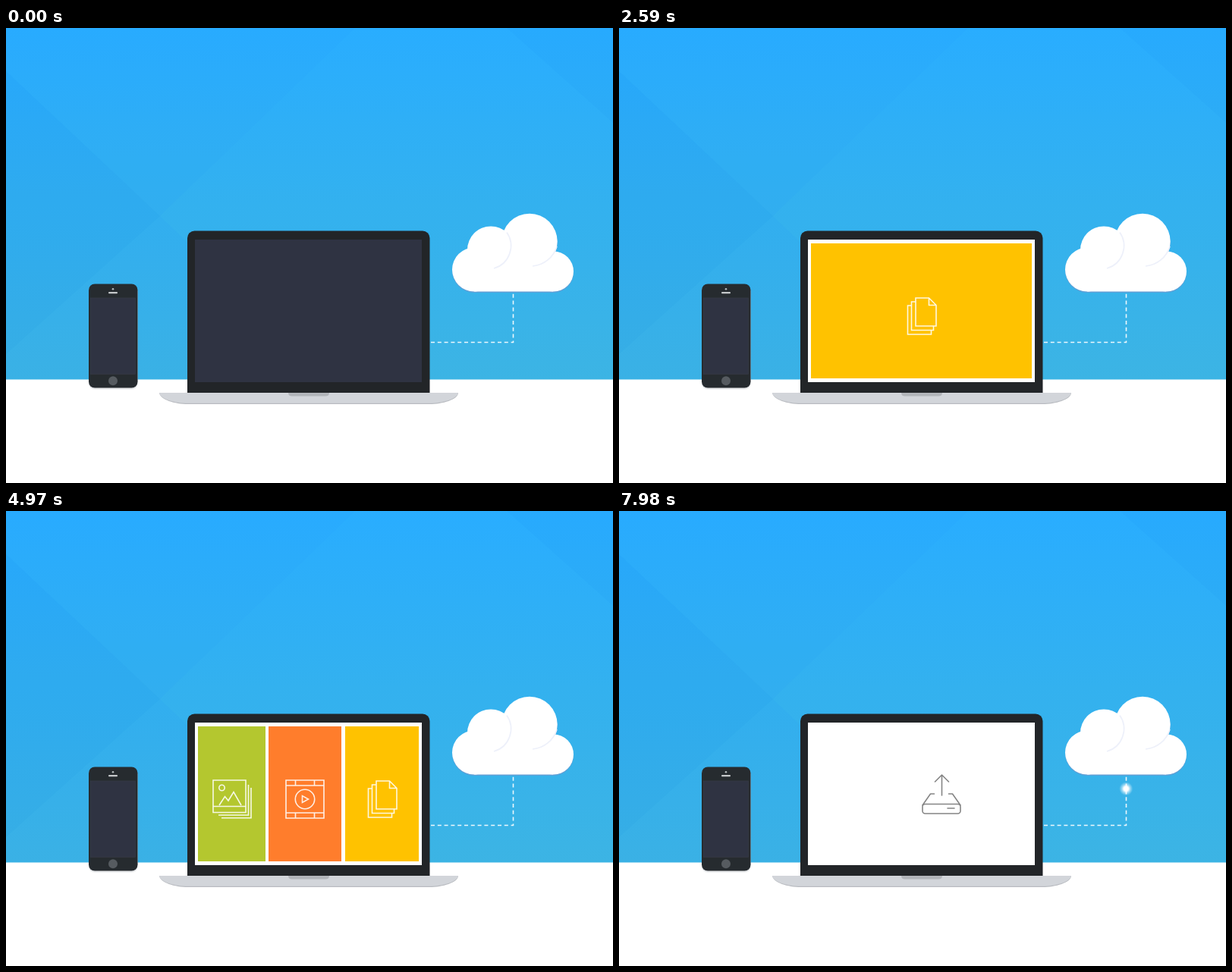
Write an HTML page that moves like this. It is 800 px wide and 600 px high and loops after 8 s.

```html
<!DOCTYPE html>
<html lang="en">
<head>
<meta charset="utf-8">
<title>Files to the cloud</title>
<style>
  html, body { margin: 0; width: 100%; height: 100%; overflow: hidden; background: #fff; }
  .stage { position: relative; width: 800px; height: 600px; overflow: hidden; }
  .scene { position: absolute; inset: 0; display: block; }

  .screen { position: absolute; left: 249px; top: 279px; width: 299px; height: 188px; overflow: hidden; background: #2f3342; }
  .page { position: absolute; inset: 0; background: #fff; }
  .row { position: absolute; inset: 0; }
  .panel { position: absolute; top: 5px; left: 4px; width: 0; height: 178px; overflow: hidden; }
  .icon { position: absolute; left: 50%; top: 70px; width: 52px; height: 52px; margin-left: -26px;
          fill: none; stroke: #fff; stroke-opacity: .88; stroke-width: 1.6; }
  .drive { left: 150px; top: 68px; stroke: #858585; stroke-opacity: 1; stroke-linecap: round; stroke-linejoin: round; }
  .green { background: #b4c72f; }
  .orange { background: #ff7d2c; }
  .yellow { background: #ffc200; }

  .page, .row, .panel, .icon, .pulse { animation: 8s linear infinite; }
  .page { animation-name: wake; }
  .row { animation-name: leave; }
  .yellow { animation-name: yellow; }
  .orange { animation-name: orange; }
  .green { animation-name: green; }
  .yellow .icon { animation-name: settle; }
  .drive { animation-name: drive; }
  .pulse { animation-name: pulse; }

  @keyframes wake {
    0%, 6.125% { opacity: 0; }
    8.75%, 100% { opacity: 1; }
  }
  @keyframes yellow {
    0%, 6.125% { left: 4px; width: 291px; transform: translateY(-187px); animation-timing-function: cubic-bezier(.65, 0, .35, 1); }
    18.125% { transform: none; }
    32.1% { left: 4px; width: 291px; animation-timing-function: cubic-bezier(.6, 0, .1, 1); }
    42.5% { left: 152px; width: 143px; }
    54.75% { left: 152px; width: 143px; animation-timing-function: cubic-bezier(.6, 0, .1, 1); }
    64.75%, 100% { left: 200px; width: 95px; transform: none; }
  }
  @keyframes settle {
    0%, 6.125% { transform: translateY(104px); animation-timing-function: cubic-bezier(.65, 0, .35, 1); }
    18.125%, 100% { transform: none; }
  }
  @keyframes orange {
    0%, 32.1% { left: 4px; width: 0; animation-timing-function: cubic-bezier(.6, 0, .1, 1); }
    42.5% { left: 4px; width: 143px; }
    54.75% { left: 4px; width: 143px; animation-timing-function: cubic-bezier(.6, 0, .1, 1); }
    64.75%, 100% { left: 101px; width: 94px; }
  }
  @keyframes green {
    0%, 54.75% { width: 0; animation-timing-function: cubic-bezier(.6, 0, .1, 1); }
    64.75%, 100% { width: 92.5px; }
  }
  @keyframes leave {
    0%, 75.625% { transform: none; animation-timing-function: cubic-bezier(.7, 0, .84, 0); }
    87.875%, 100% { transform: translateX(300px); }
  }
  @keyframes drive {
    0%, 86.6% { opacity: 0; }
    91.2%, 100% { opacity: 1; }
  }
  @keyframes pulse {
    0%, 84.87% { opacity: 0; transform: translate(558px, 414.5px); }
    84.875% { opacity: 1; transform: translate(558px, 414.5px); animation-timing-function: cubic-bezier(.4, .6, .6, 1); }
    93.625% { transform: translate(668.3px, 414.5px); }
    95% { transform: translate(668.3px, 414.5px); animation-timing-function: cubic-bezier(.4, 0, .8, .8); }
    100% { opacity: 1; transform: translate(668.3px, 363.5px); }
  }
</style>
</head>
<body>
<div class="stage">
  <svg class="scene" width="800" height="600" viewBox="0 0 800 600">
    <defs>
      <linearGradient id="sky" x2="0" y2="1">
        <stop offset="0" stop-color="#29adff"/>
        <stop offset=".5" stop-color="#33b1ef"/>
        <stop offset="1" stop-color="#3cb4e4"/>
      </linearGradient>
      <radialGradient id="glow">
        <stop offset=".35" stop-color="#fff"/>
        <stop offset=".6" stop-color="#fff" stop-opacity=".5"/>
        <stop offset="1" stop-color="#fff" stop-opacity="0"/>
      </radialGradient>
      <g id="cloud">
        <circle cx="617" cy="318.5" r="29"/>
        <circle cx="639" cy="292.5" r="31"/>
        <circle cx="690" cy="281.5" r="36.7"/>
        <circle cx="721.5" cy="321" r="26.5"/>
        <path d="M617 300H721V347.5H617Z"/>
      </g>
    </defs>

    <path fill="#fff" d="M0 0H800V600H0Z"/>
    <path fill="url(#sky)" d="M0 0H800V463.5H0Z"/>
    <g fill="#0a70e8">
      <path fill-opacity=".09" d="M0 57L203 248L0 430Z"/>
      <path fill-opacity=".03" d="M0 0H460L203 248L0 57Z"/>
      <path fill-opacity=".03" d="M0 430L203 248L240 283V463H0Z"/>
      <path fill-opacity=".05" d="M660 0H800V125Z"/>
    </g>

    <path fill="none" stroke="#fff" stroke-opacity=".9" stroke-width="1.6" stroke-dasharray="5 3.8" d="M560 414.5H668.5V347"/>
    <circle class="pulse" r="9" fill="url(#glow)"/>

    <use href="#cloud" y="1.5" fill="#5f9fd6"/>
    <use href="#cloud" fill="#fff"/>
    <path fill="none" stroke="#edf0fa" stroke-width="1.6" d="M660 269.500A31 31 0 0 1 643 317M726 288A36.700 36.700 0 0 1 694 314"/>

    <rect x="109" y="339" width="64.500" height="137.500" rx="8" fill="#e4e6e8"/>
    <rect x="109" y="337.500" width="64.500" height="137" rx="8" fill="#262b2f"/>
    <rect x="111.500" y="356" width="59" height="100.500" fill="#2f3342" stroke="#3a3d49" stroke-width=".6"/>
    <rect x="135" y="348" width="12" height="2.200" rx="1" fill="#c5c8ca"/>
    <circle cx="141" cy="344.300" r="1.300" fill="#b5babd"/>
    <circle cx="141" cy="465.200" r="6" fill="#565b60"/>

    <path fill="#222528" d="M239 481V277A9.500 9.500 0 0 1 248.500 267.500H549A9.500 9.500 0 0 1 558.500 277V481Z"/>
    <path fill="#b9bcc1" d="M202 481H596C596 490 575 496 558 496H240C222 496 203 490 202 481Z"/>
    <path fill="#d2d5da" d="M202 481H596C595 489 575 494.800 558 494.800H240C222 494.800 203 489 202 481Z"/>
    <path fill="#b2b5ba" d="M372 481H426Q426 485.500 421 485.500H377Q372 485.500 372 481Z"/>
  </svg>

  <div class="screen">
    <div class="page">
      <svg class="icon drive" style="margin:0" viewBox="0 0 52 52" overflow="visible">
        <path d="M.500 28V1M-8.500 10L.500 1L9.500 10" transform="translate(26)"/>
        <path d="M1 41L11.500 26H16.500M51 41L40.500 26H35.500M34 45H43"/>
        <rect x="1" y="39.500" width="50" height="12.500" rx="3.500"/>
      </svg>
      <div class="row">
        <div class="panel green">
          <svg class="icon" viewBox="0 0 52 52">
            <path d="M1 1H44V43.500H1ZM1 35.500H44M9 34L16.500 22.500L21 28L28 16.500L38 34M47.500 7V47H8M51 11V50.700H12"/>
            <circle cx="12.500" cy="11" r="3.700"/>
          </svg>
        </div>
        <div class="panel orange">
          <svg class="icon" viewBox="0 0 52 52">
            <path d="M1 1H51V51H1ZM1 8H51M1 44H51M13.500 1V8M38.500 1V8M13.500 44V51M38.500 44V51M22.500 21.500V30.500L30.500 26Z"/>
            <circle cx="26" cy="26" r="12.700"/>
          </svg>
        </div>
        <div class="panel yellow">
          <svg class="icon" viewBox="0 0 52 52">
            <path d="M18 2H35.500L45 11.500V39H18ZM35.500 2V11.500H45M18 7H12.500V44.500H41.500V39M12.500 12H7.500V50H38.500V44.500"/>
          </svg>
        </div>
      </div>
    </div>
  </div>
</div>
</body>
</html>
```
